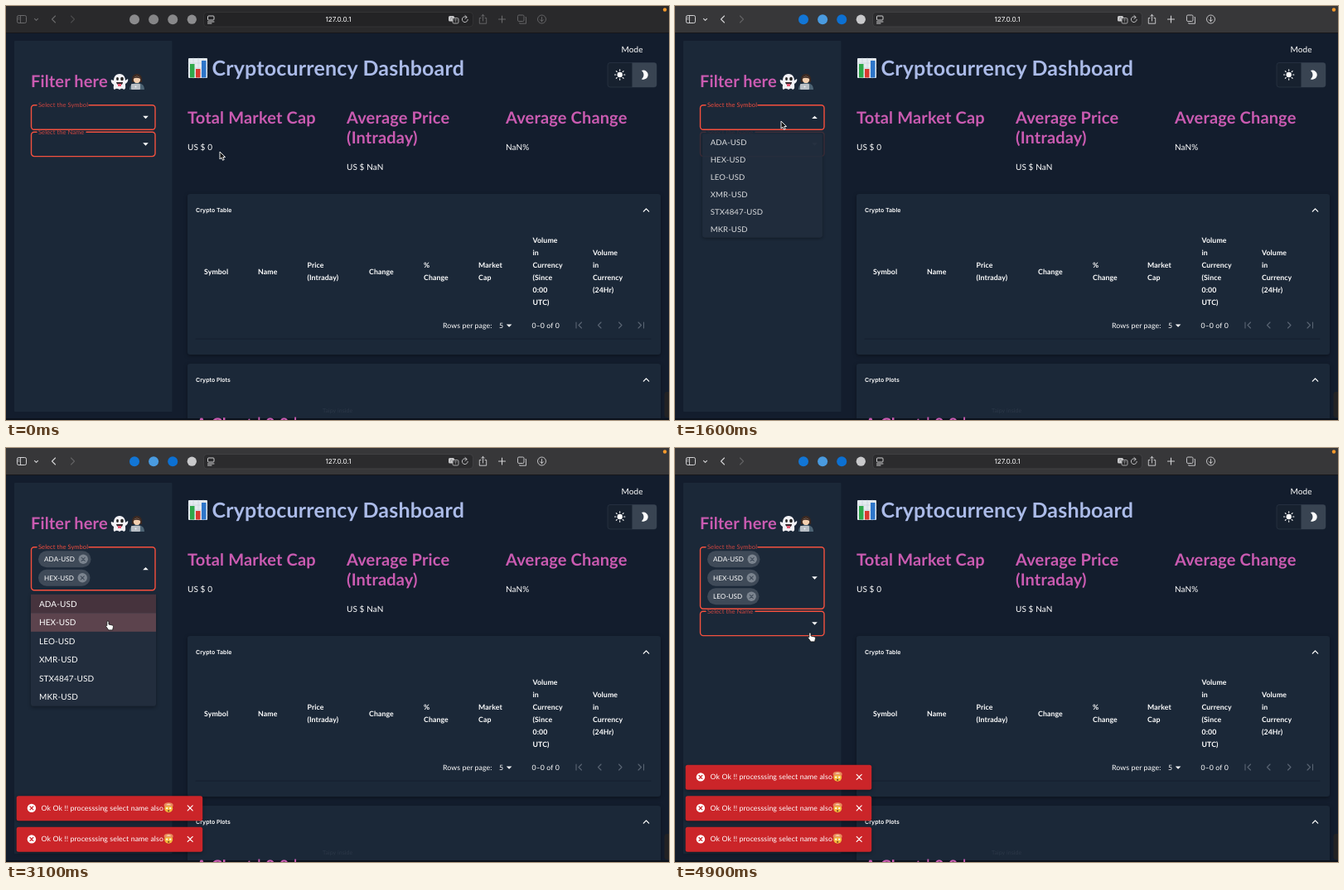
Write an HTML page that moves like this. It is 800 by 500 pixels and loops after 5000 ms.

```html
<!DOCTYPE html>
<html lang="en">
<head>
<meta charset="utf-8">
<title>Cryptocurrency Dashboard</title>
<style>
html, body { margin: 0; width: 100%; height: 100%; overflow: hidden; background: #131d2d; }
svg { display: block; width: 800px; height: 500px; }
text { font-family: Lato, "Open Sans", sans-serif; fill: #fff; font-size: 10px; letter-spacing: .0094em; white-space: pre; text-rendering: geometricPrecision; }
.h1 { font-size: 25px; font-weight: 700; letter-spacing: .0074em; fill: #abbbe8; }
.h2 { font-size: 20px; font-weight: 700; letter-spacing: .0075em; fill: #ca5bb1; }
.th { font-size: 8.75px; font-weight: 700; letter-spacing: .0107em; }
.sm { font-size: 8.75px; letter-spacing: .0107em; }
.chip { font-size: 8.125px; }
.label { font-size: 7.5px; fill: #cc4540; }
.focus { fill: #ee4c3e; }
.bar { font-family: Inter, sans-serif; font-size: 8.2px; letter-spacing: 0; text-anchor: middle; }
.card { font-family: Inter, sans-serif; font-size: 7px; font-weight: 600; letter-spacing: 0; }
.line { fill: none; stroke-linecap: round; stroke-linejoin: round; }
</style>
</head>
<body>
<svg viewBox="0 0 800 500" xmlns="http://www.w3.org/2000/svg">
  <defs>
    <filter id="shadow" x="-20%" y="-20%" width="140%" height="150%" color-interpolation-filters="sRGB">
      <feDropShadow dx="0" dy="1.5" stdDeviation="2" flood-color="#000" flood-opacity=".35"/>
    </filter>
  </defs>
  <g id="page"></g>
  <g id="toolbar"></g>
  <g id="fields"></g>
  <g id="menu"></g>
  <g id="toasts"></g>
  <g id="cursor"></g>
  <circle cx="795" cy="4.5" r="2.2" fill="#f59a2c"/>
</svg>
<script>
const LOOP = 5000, STEP = 100;
const ROW = 22.5, TOAST_GAP = 37.5;
const ACTIVE_AT = 900, OPEN_AT = 1500, CLOSE_AT = 4450;
const PICKS = [2300, 2800, 3400];
const SYMBOLS = ['ADA-USD', 'HEX-USD', 'LEO-USD', 'XMR-USD', 'STX4847-USD', 'MKR-USD'];
const CHIP_WIDTHS = [63.5, 62.5, 62.5];
// time, x, y of the pointer tip
const PATH = [
  [0, 258, 176], [200, 257, 176], [800, 140, 150], [1100, 132, 154], [1400, 128, 140],
  [1600, 128, 139], [2200, 125, 165], [2300, 125, 166], [2600, 123, 184], [2800, 123, 186],
  [3100, 123, 209], [3300, 123, 228], [3500, 123, 230], [4000, 171, 172], [4200, 173, 166],
  [4300, 173, 155], [4500, 173, 155], [4900, 163, 223], [5000, 163, 223]
];

const $ = id => document.getElementById(id);
const clamp = v => Math.max(0, Math.min(1, v));
const ease = v => { v = clamp(v); return v * v * (3 - 2 * v); };
const easeOut = v => 1 - Math.pow(1 - clamp(v), 3);
const text = (x, y, s, cls = '') => `<text x="${x}" y="${y}" class="${cls}">${s}</text>`;
const rect = (x, y, w, h, fill, r = 0, extra = '') =>
  `<rect x="${x}" y="${y}" width="${w}" height="${h}" rx="${r}" fill="${fill}" ${extra}/>`;
const circle = (x, y, r, fill) => `<circle cx="${x}" cy="${y}" r="${r}" fill="${fill}"/>`;
const line = (d, color, w = 1) => `<path class="line" d="${d}" stroke="${color}" stroke-width="${w}"/>`;
const fill = (d, color) => `<path d="${d}" fill="${color}"/>`;
const group = (x, y, s, extra = '') => `<g transform="translate(${x} ${y})" ${extra}>${s}</g>`;
const lines = (x, y, words, cls, gap) => words.map((w, i) => text(x, y + i * gap, w, cls)).join('');

function chartEmoji() {
  let s = rect(220, 63, 23, 24, '#e4eaef', 1);
  for (let i = 1; i < 4; i++) s += line(`M220 ${63 + i * 6}H243M${220 + i * 6} 63V87`, '#bccad4', .5);
  return s + rect(222, 70, 5.5, 16.5, '#2fa84a') + rect(229, 76, 5.5, 10.5, '#d93a2f') + rect(236, 66, 5.5, 20.5, '#2d75c9');
}

function ghostEmoji() {
  return fill('M137 82c5 0 7 4 7 8l3-2c1 2-1 5-3 6 0 4 1 6-2 7-2-2-3-1-5 0-2-1-4-2-6 0-2-1-1-4-1-6-2-1-4-4-3-6l3 1c0-4 2-8 7-8z', '#f1f1f5') +
    `<ellipse cx="134.5" cy="88" rx="1.4" ry="2" fill="#222"/><ellipse cx="140" cy="88" rx="1.8" ry="2.3" fill="#222"/>` +
    fill('M133 92h8c0 5-7 5-8 0z', '#37292e') + fill('M135 94h4v3h-4z', '#e65a74');
}

function coderEmoji() {
  return fill('M152 92c-1-8 3-10 6-10s7 2 6 10z', '#3b2922') + circle(158, 89, 4.2, '#f3cfb0') +
    fill('M153.5 88c1-4 8-4 9 0-3-1-6-2-9 0z', '#3b2922') +
    fill('M149 101c0-6 4-8 9-8s9 2 9 8z', '#4d6474') + rect(151, 94, 11, 7, '#b8bec5', 1) + circle(156.5, 97.5, 1, '#eef0f2');
}

function blownEmoji() {
  return circle(0, 1, 5, '#f3b83c') + fill('M-5-1c-2-4 2-5 5-5s7 1 5 5c-3-1-7-1-10 0z', '#e8895b') +
    fill('M-3-3c1-2 5-2 6 0z', '#f6d9b4') + circle(-2, 1, 1.1, '#fff') + circle(2, 1, 1.1, '#fff') + circle(0, 4, 1, '#6a3b22');
}

function drawPage() {
  const sun = Array.from({ length: 8 }, (_, i) => {
    const a = i * Math.PI / 4, c = Math.cos(a), s = Math.sin(a);
    return `M${c * 4.9} ${s * 4.9}L${c * 6.2} ${s * 6.2}`;
  }).join('');
  const gray = '#596473';
  const chevron = y => line(`M769.3 ${y + 1.6}l3.2-3.2 3.2 3.2`, '#fff', 1.3);
  $('page').innerHTML =
    rect(0, 0, 800, 500, '#131d2d') +
    rect(10, 42, 190.5, 448, '#1b2838', 1) +
    text(30, 98, 'Filter here', 'h2') + ghostEmoji() + coderEmoji() +
    chartEmoji() + text(248.5, 83.5, 'Cryptocurrency Dashboard', 'h1') +
    text(742.5, 56, 'Mode') +
    rect(726, 68.5, 59, 29.5, '#17212f', 3, 'stroke="#2c3747" stroke-width=".7"') +
    fill('M755.5 68.5h26.5a3 3 0 0 1 3 3v23.5a3 3 0 0 1-3 3h-26.5z', '#394452') +
    group(740.7, 83, circle(0, 0, 3.2, '#fff') + line(sun, '#fff', 1.1)) +
    fill('M766.8 78a5.6 5.6 0 1 1 0 10.2 6.2 6.2 0 0 0 0-10.2z', '#fff') +
    text(219, 141.5, 'Total Market Cap', 'h2') + text(219, 174, 'US $ 0') +
    lines(411, 141.5, ['Average Price', '(Intraday)'], 'h2', 24) + text(411, 198, 'US $ NaN') +
    text(603, 141.5, 'Average Change', 'h2') + text(603, 174, 'NaN%') +
    rect(219, 227, 571, 194, '#1b2838', 3, 'filter="url(#shadow)"') +
    text(229, 249.3, 'Crypto Table', 'card') + chevron(246.5) +
    text(239, 324, 'Symbol', 'th') + text(304, 324, 'Name', 'th') +
    lines(363.5, 316, ['Price', '(Intraday)'], 'th', 15) + text(438, 324, 'Change', 'th') +
    lines(504, 316, ['%', 'Change'], 'th', 15) + lines(570, 316, ['Market', 'Cap'], 'th', 15) +
    lines(635.5, 286, ['Volume', 'in', 'Currency', '(Since', '0:00', 'UTC)'], 'th', 15) +
    lines(708, 301, ['Volume', 'in', 'Currency', '(24Hr)'], 'th', 15) +
    text(527, 388.5, 'Rows per page:', 'sm') + text(595, 388.5, '5', 'sm') +
    fill('M603.8 384.5h6.6l-3.3 3.3z', '#fff') + text(634.5, 388.5, '0–0 of 0', 'sm') +
    line('M688 382v7M694.5 382l-3.5 3.5 3.5 3.5M718 382l-3.5 3.5 3.5 3.5M739.5 382l3.5 3.5-3.5 3.5M763 382l3.5 3.5-3.5 3.5M769.5 382v7', gray, 1.1) +
    line('M229 402.2H778', '#162130', 1.2) +
    rect(219, 432, 571, 80, '#1b2838', 3, 'filter="url(#shadow)"') +
    text(229, 454.3, 'Crypto Plots', 'card') + chevron(451.5) +
    rect(0, 498, 800, 2, '#0b111b') +
    text(229, 511.5, 'A Chart | 0 0 |', 'h2') +
    `<text x="382" y="490.5" style="font-size:7px;fill:#2c3848">Taipy inside</text>` +
    rect(794.5, 466, 8, 31, '#222224', 3);
}

function drawToolbar(active) {
  const ink = active ? '#d2d2d4' : '#69696b', dim = active ? '#626264' : '#4b4b4d';
  const spots = active ? ['#1276d6', '#4a9be0', '#0c70d2', '#c9c9cb'] : ['#8b8b8d', '#858587', '#88888a', '#8d8d8f'];
  $('toolbar').innerHTML =
    rect(0, 0, 800, 33, active ? '#373739' : '#29292b') + rect(0, 32, 800, 1, '#17171a') +
    rect(13.5, 11.5, 11, 9, 'none', 1.8, `stroke="${ink}"`) + line('M17.5 11.5v9M15 14h1M15 16h1', ink, .9) +
    line('M34.5 15.3l2 2 2-2', ink, 1.1) + line('M59.5 12l-4 4 4 4', ink, 1.1) + line('M78.5 12l4 4-4 4', dim, 1.1) +
    spots.map((c, i) => circle(155 + i * 23.1, 16.2, i === 3 ? 5.6 : 6, c)).join('') +
    rect(238.5, 7.5, 325, 17.5, active ? '#2b2b2d' : '#232325', 4, `stroke="${active ? '#454547' : '#363638'}" stroke-width=".8"`) +
    rect(243.5, 12, 7.5, 5, 'none', 1, 'stroke="#dededf" stroke-width=".9"') + line('M243.5 19h7.5M243.5 21h4.5', '#dededf', .9) +
    text(401, 19, '127.0.0.1', 'bar') +
    rect(534, 12, 7, 6.5, '#c9c9cb', 1.5) + rect(539, 14.5, 7, 6.5, '#2b2b2d', 1.5, 'stroke="#c9c9cb" stroke-width=".8"') +
    line('M536 16.5l1.5-3 1.5 3M541 16.5h3M542.5 16v3', '#88888a', .7) +
    line('M556 13.6a3.4 3.4 0 1 0 1.2 2.8M554 11.6l2.2 2-2.2 1.8', '#d2d2d4', .9) +
    line('M573 14.5h-1.7v6.7h8.4v-6.7H578M575.5 18v-7.5M573.5 12.3l2-2 2 2', ink, .9) +
    line('M594.5 16h8M598.5 12v8', ink, 1.1) +
    rect(617.5, 11, 7.5, 7.5, 'none', 1.4, `stroke="${ink}" stroke-width=".9"`) +
    line('M627 13.5h.5v7.7h-7.7v-.7', ink, .9) +
    `<circle cx="646.5" cy="16" r="5" fill="none" stroke="${ink}" stroke-width=".9"/>` +
    line('M646.5 13.5v5M644.5 16.7l2 2 2-2', ink, .9);
}

function field(y, h, label, notch, open) {
  const b = y + h, mid = y + h / 2;
  const frame = `M${notch} ${y}H176.5a3.5 3.5 0 0 1 3.5 3.5V${b - 3.5}a3.5 3.5 0 0 1-3.5 3.5H34a3.5 3.5 0 0 1-3.5-3.5V${y + 3.5}a3.5 3.5 0 0 1 3.5-3.5h3`;
  const tip = open ? `M165.2 ${mid + 1.6}h6.6l-3.3-3.3z` : `M165.2 ${mid - 1.6}h6.6l-3.3 3.3z`;
  return line(frame, open ? '#f64f3d' : '#f4513f', 1.4) + fill(tip, '#fff') +
    text(39, y + 2.2, label, open ? 'label focus' : 'label');
}

function chip(i) {
  const y = 134.3 + i * ROW, w = CHIP_WIDTHS[i], x = 39 + w - 9.3;
  return rect(39, y - 10, w, 20, '#3f4a58', 10) + text(46, y + 2.9, SYMBOLS[i], 'chip') +
    circle(x, y, 5.7, '#7b848f') + line(`M${x - 2} ${y - 2}l4 4m0-4l-4 4`, '#3f4a58', 1.1);
}

function drawFields(count, open, shown) {
  const extra = Math.max(0, count - 1) * ROW;
  let s = field(119.7, 29.5 + extra, 'Select the Symbol', 100, open);
  for (let i = 0; i < count; i++) s += chip(i);
  $('fields').innerHTML = s + `<g opacity="${1 - shown}">` +
    field(152.3 + extra, 29.3, 'Select the Name', 97, false) + '</g>';
}

function drawMenu(count, top, shown, hover, scale) {
  if (shown <= 0) { $('menu').innerHTML = ''; return; }
  const rows = SYMBOLS.map((name, i) => {
    const on = i < count, over = i === hover;
    const tint = on ? (over ? '#5c434d' : '#46333d') : over ? '#313c4b' : 'none';
    return rect(0, i * ROW, 151, ROW, tint) + text(10, i * ROW + 15, name);
  }).join('');
  const body = rect(0, 0, 151, ROW * 6, '#222d3d', 3, 'filter="url(#shadow)"') + rows;
  $('menu').innerHTML = `<g opacity="${shown}" transform="translate(105.5 ${top}) scale(${.75 + .25 * scale} ${.56 + .44 * scale}) translate(-75.5 0)">${body}</g>`;
}

function toast(x, y) {
  return group(x, y,
    rect(0, 0, 224.5, 30, '#cb2529', 2.5, 'filter="url(#shadow)"') +
    circle(18.2, 14.7, 5.2, '#fff') + line('M16.3 12.8l3.8 3.8m0-3.8l-3.8 3.8', '#cb2529', 1.2) +
    text(29.8, 17.8, 'Ok Ok !! processsing select name also', 'sm') + group(183.5, 14, blownEmoji()) +
    line('M206.5 11.6l6 6m0-6l-6 6', '#fff', 1.2));
}

function drawToasts(t) {
  $('toasts').innerHTML = PICKS.map((start, i) => {
    if (t < start) return '';
    const lift = PICKS.slice(i + 1).reduce((sum, later) => sum + easeOut((t - later) / 250), 0);
    return toast(12.7 - 245 * (1 - easeOut((t - start) / 225)), 457.7 - TOAST_GAP * lift);
  }).join('');
}

function pointer(t) {
  const i = PATH.findIndex((p, n) => n > 0 && t <= p[0]);
  const [t0, x0, y0] = PATH[i - 1], [t1, x1, y1] = PATH[i];
  const k = ease((t - t0) / (t1 - t0));
  return [x0 + (x1 - x0) * k, y0 + (y1 - y0) * k];
}

function drawCursor(x, y, hand) {
  const shape = hand
    ? `<path d="M-1.2 1c0-1.5 2.2-1.5 2.2 0v3l4.3 1c1.2.3 1.3 1.3 1.1 2.5l-.8 3.4H.7C0 9.2-1.5 8-2.4 6.5c-.5-1 .4-1.7 1.2-.7z" fill="#fff" stroke="#111" stroke-width=".8"/>`
    : `<path d="M0 0v9l2.1-1.8 1.4 3.1 1.7-.8-1.4-3h2.8z" fill="#111" stroke="#fff" stroke-width=".9" stroke-linejoin="round"/>`;
  $('cursor').innerHTML = group(x, y, shape);
}

let wasActive;
function render(t) {
  const active = t >= ACTIVE_AT;
  if (active !== wasActive) drawToolbar(wasActive = active);
  const count = PICKS.filter(p => t >= p).length;
  const open = t >= OPEN_AT && t < CLOSE_AT;
  const shown = t < CLOSE_AT ? easeOut((t - OPEN_AT) / 220) : 1 - ease((t - CLOSE_AT) / 200);
  const top = 154.3 + Math.max(0, count - 1) * ROW;
  const [x, y] = pointer(t);
  const inside = x > 30 && x < 181;
  const row = open && inside ? Math.floor((y - top) / ROW) : -1;
  const overField = !open && active && inside && y > 119;
  drawFields(count, open, shown);
  drawMenu(count, top, shown, row, t < CLOSE_AT ? shown : 1);
  drawToasts(t);
  drawCursor(x, y, overField || row >= 0);
}

drawPage();
const begin = performance.now();
function tick() {
  const t = (performance.now() - begin) % LOOP;
  render(Math.floor(t / STEP) * STEP);
  requestAnimationFrame(tick);
}
tick();
</script>
</body>
</html>
```
